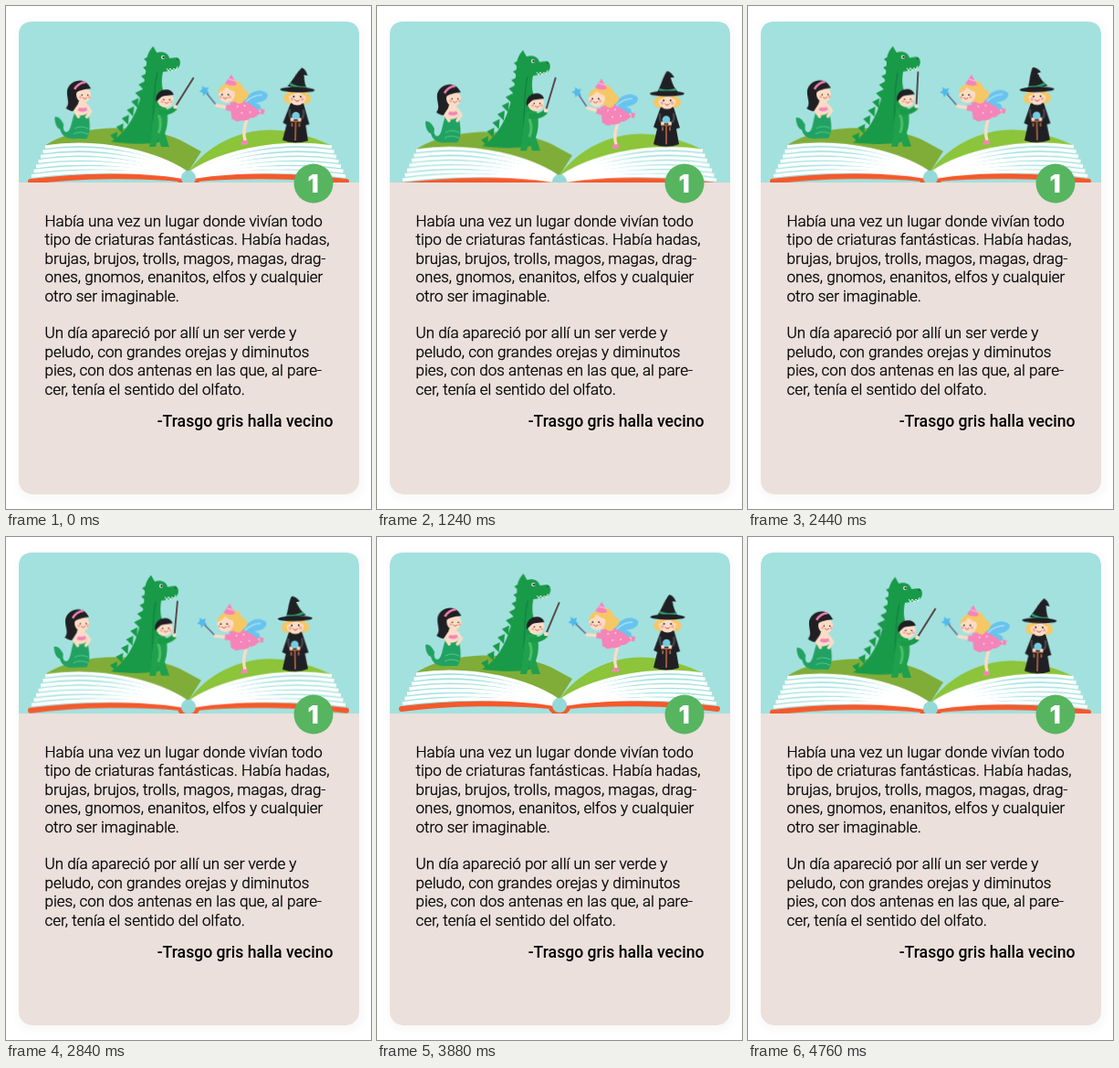
An HTML page for the animation above (4.8 s loop, 400 by 550 pixels).

```html
<!DOCTYPE html>
<html lang="es">
<head>
<meta charset="utf-8">
<title>Cuento</title>
<style>
html, body { margin: 0; width: 100%; height: 100%; overflow: hidden; background: #fff; }
svg { display: block; width: 400px; height: 550px; }
.story { font: 300 17px Roboto, sans-serif; fill: #000; stroke: #000; stroke-width: .35; }
.sign { font: 500 17.6px Roboto, sans-serif; fill: #000; }
.num { font: 900 27px Inter, sans-serif; fill: #fff; }
.skin { fill: #fcdcc4; }
.limb { fill: none; stroke: #fcdcc4; stroke-width: 3.4; stroke-linecap: round; }
.ink { fill: #202024; }
.smile { fill: none; stroke: #b4423c; stroke-width: 1; stroke-linecap: round; }
.cheek { fill: #f9a9a0; }
.pink { fill: #f584b9; }
.green { fill: #199a48; }
.gold { fill: #f6c765; }
</style>
</head>
<body>
<svg viewBox="0 0 400 550">
  <defs>
    <clipPath id="sky"><path d="M14 193V32Q14 17 30 17H371Q387 17 387 32V193Z"/></clipPath>
    <filter id="soft"><feGaussianBlur stdDeviation="4"/></filter>
    <g id="face">
      <circle class="ink" cx="-4" cy="-1" r="1"/><circle class="ink" cx="4" cy="-1" r="1"/>
      <circle class="cheek" cx="-6" cy="2" r="1.9"/><circle class="cheek" cx="6" cy="2" r="1.9"/>
      <path class="smile" d="M-2.5 3Q0 6 2.5 3"/>
    </g>
  </defs>

  <rect x="12" y="16" width="380" height="524" rx="16" fill="#000" opacity=".025" filter="url(#soft)"/>
  <rect x="14" y="17" width="373" height="517" rx="15" fill="#ebe0db"/>

  <g clip-path="url(#sky)">
    <path d="M14 17H387V193H14Z" fill="#a3e1de"/>
    <g id="book">
      <path d="M27 192C80 185 150 185 190 189C193 199 207 199 210 189C250 185 320 185 373 192" fill="none" stroke="#f4592c" stroke-width="6" stroke-linecap="round"/>
      <path d="M42 153C75 130 145 127 190 146L214 159L200 181C170 163 110 143 42 153Z" fill="#80ad38"/>
      <path d="M200 181C222 150 262 132 300 136C325 139 342 146 358 153C290 144 230 163 200 181Z" fill="#8cc43a"/>
      <g id="pages" fill="none" stroke="#fff" stroke-width="3.7"></g>
      <circle cx="200" cy="188" r="8" fill="#94d9d8"/>

      <g id="mermaid">
        <path d="M75 116C71 127 71 138 66 138C63 138 62 134 63 130C60 124 57 121 53 122C53 128 55 134 59 135C61 143 67 146 76 145H88C92 141 93 129 89 116Z" fill="#22a262"/>
        <path d="M75 134Q82 130 90 134M74 140Q81 136 90 140" fill="none" stroke="#52c98a" stroke-width="1"/>
        <path class="ink" d="M90 87C85 78 69 80 66 92C65 101 70 106 65 112C71 117 81 117 82 106Z"/>
        <path class="skin" d="M79 104H87L89 117Q82 122 75 118Z"/>
        <ellipse class="skin" cx="84" cy="97" rx="8" ry="8.5"/>
        <path class="ink" d="M74 96C74 83 87 81 92 90C84 91 79 92 74 96Z"/>
        <path d="M74 91Q78 84 86 83" fill="none" stroke="#f480b4" stroke-width="2.6"/>
        <use href="#face" transform="translate(85.5 98) scale(.8)"/>
        <path class="pink" d="M78 110Q83 113 88 110L88 114Q83 117 78 114Z"/>
        <path class="limb" d="M79 109L75 115L79 121M88 109L92 115L88 121" stroke-width="2.6"/>
      </g>

      <g id="dragon">
        <g id="spines" class="green"></g>
        <path class="green" d="M160 44L164 51C171 49 177 52 178 57L186 56C191 57 191 65 187 68C182 71 176 71 171 72C169 82 170 92 174 98V130L168 149C150 152 130 151 115 149C130 140 141 122 146 103C150 88 152 78 153 62C153 52 157 48 160 44Z"/>
        <path d="M165 73C160 92 163 112 159 146" fill="none" stroke="#108040" stroke-width="1.2"/>
        <path d="M175 68L177 71L179 68L181 71L183 68L185 70L187 66" fill="none" stroke="#fff" stroke-width=".9"/>
        <circle cx="171" cy="56" r="2" fill="#fff"/><circle class="ink" cx="171.500" cy="56" r="1.2"/>
        <circle class="ink" cx="187" cy="58" r=".7"/>
        <path d="M164 111H175C178 120 177 132 174 139L179 154H170L167 143L164 154H157C160 140 159 124 164 111Z" fill="#1fa04c"/>
        <path d="M167 119Q171 129 167 139" fill="none" stroke="#4dbd68" stroke-width="3"/>
        <circle class="skin" cx="174" cy="102" r="9"/>
        <path class="ink" d="M164 105C161 90 181 87 183 97C178 98 171 97 168 101Z"/>
        <use href="#face" transform="translate(175.500 103) scale(.8)"/>
        <path d="M185 110V73" id="wand" stroke="#594c4b" stroke-width="2" stroke-linecap="round"/>
        <path class="green" d="M167 113Q177 115 183 109L187 113Q179 121 167 119Z"/>
        <circle class="skin" cx="185" cy="110" r="2.300"/>
      </g>

      <g id="fairy">
        <path d="M259 106C264 94 278 88 286 96C287 102 280 105 272 106C280 107 281 113 275 114C268 114 262 111 259 106Z" fill="#68c4ee"/>
        <path d="M262 105Q270 97 280 97" fill="none" stroke="#a5ddf5" stroke-width="1.5"/>
        <path class="limb" d="M264 122C262 131 259 138 262 147M270 119L280 115"/>
        <path class="pink" d="M259 147H265V151L257 152ZM278 112L283 113L282 118L279 118Z"/>
        <path class="pink" d="M245 106L257 102C264 106 274 110 279 117C274 119 273 123 268 122C263 127 259 124 255 126C251 128 249 123 247 124Z"/>
        <path d="M252 110h2M260 109h2M257 117h2M266 116h2" stroke="#fff" stroke-width="1.500" opacity=".6"/>
        <circle class="gold" cx="248" cy="93" r="11.500"/><circle class="gold" cx="259" cy="97" r="6"/><circle class="gold" cx="255" cy="102" r="5"/>
        <circle class="skin" cx="241" cy="97" r="9"/>
        <path class="gold" d="M232 96C232 83 250 81 253 94C246 94 243 90 240 89C239 93 235 93 232 96Z"/>
        <use href="#face" transform="translate(239.500 98) scale(.85)"/>
        <path class="pink" d="M246 75L252 86Q246 89 239 85Z"/>
        <path d="M243 80L250 82" stroke="#f9b4d2" stroke-width="1.4"/>
        <g id="arm">
          <path d="M231 110L217 93" stroke="#666b91" stroke-width="1.5"/>
          <path class="limb" d="M247 112L230 109"/>
          <path class="pink" d="M252 109L241 108L240 114L250 116Z"/>
          <path id="star" fill="#54b9ea"/>
        </g>
      </g>

      <g id="witch">
        <path class="ink" d="M311 106H325L332 129L328 130L331 147Q317 152 303 147L307 130L303 128Z"/>
        <circle class="gold" cx="309" cy="101" r="6"/><circle class="gold" cx="327" cy="101" r="6"/>
        <circle class="skin" cx="318" cy="99" r="9.500"/>
        <path class="gold" d="M306 100C307 87 329 87 330 100C325 98 322 96 319 92C316 96 311 98 306 100Z"/>
        <use href="#face" transform="translate(318 100) scale(.95)"/>
        <path d="M310 113Q309 124 315 124M325 113Q327 124 320 124" fill="none" stroke="#44444a" stroke-width="2.400"/>
        <path d="M311 126H323M317 126V147M313 128V132M321 128V132" fill="none" stroke="#98593e" stroke-width="2"/>
        <circle class="skin" cx="313" cy="124" r="2"/><circle class="skin" cx="321" cy="124" r="2"/>
        <circle cx="317" cy="120" r="4.300" fill="#75cce1"/>
        <g id="hat">
          <path class="ink" d="M307 90C311 84 313 74 318 67C321 67 324 70 326 74L322 74C324 81 326 86 330 90Z"/>
          <path d="M309 87Q318 90 328 87" fill="none" stroke="#2fa06e" stroke-width="2.400"/>
        </g>
        <ellipse class="ink" cx="318" cy="91.500" rx="19" ry="3"/>
      </g>
    </g>
  </g>

  <circle cx="337" cy="194" r="21.500" fill="#57b560"/>
  <text class="num" x="336.500" y="203.500" text-anchor="middle">1</text>
  <g class="story" id="story"></g>
  <text class="sign" x="358.500" y="460" text-anchor="end">-Trasgo gris halla vecino</text>
</svg>
<script>
const $ = id => document.getElementById(id);
const add = (parent, name, attrs) => {
  const el = document.createElementNS('http://www.w3.org/2000/svg', name);
  for (const key in attrs) el.setAttribute(key, attrs[key]);
  return parent.appendChild(el);
};

const lines = [
  'Había una vez un lugar donde vivían todo',
  'tipo de criaturas fantásticas. Había hadas,',
  'brujas, brujos, trolls, magos, magas, drag-',
  'ones, gnomos, enanitos, elfos y cualquier',
  'otro ser imaginable.',
  '',
  'Un día apareció por allí un ser verde y',
  'peludo, con grandes orejas y diminutos',
  'pies, con dos antenas en las que, al pare-',
  'cer, tenía el sentido del olfato.'
];
lines.forEach((line, i) => {
  add($('story'), 'text', { x: 42.5, y: 241 + i * 20.4 }).textContent = line;
});

// Fanned page edges, mirrored about the spine
for (let k = 0; k < 7; k++) {
  const u = k / 6;
  const d = `M${43 - 15 * u} ${154 + 32 * u}C${110 - 30 * u} ${144 + 35 * u} ` +
    `${170 - 20 * u} ${164 + 16 * u} ${196 - 3 * u} ${181 + 6 * u}`;
  add($('pages'), 'path', { d });
  add($('pages'), 'path', { d, transform: 'matrix(-1 0 0 1 400 0)' });
}

// Spines down the back
for (let i = 0; i < 10; i++) {
  const u = i / 9;
  const x = 157 - 36 * u ** 1.7, y = 59 + 84 * u;
  add($('spines'), 'path', { d: `M${x + 1} ${y - 5}L${x - 7} ${y - 1}L${x} ${y + 6}Z` });
}

const points = Array.from({ length: 10 }, (_, i) => {
  const r = i % 2 ? 3 : 6, a = i * Math.PI / 5 - 2;
  return `${217 + r * Math.cos(a)} ${93 + r * Math.sin(a)}`;
});
$('star').setAttribute('d', `M${points.join('L')}Z`);

// id, pivot, transform function, one extreme, other extreme, phase in ms
const half = 2400;
const moves = [
  ['book', '0 0', 'translateY', '-4.3px', '4.3px', 1200],
  ['mermaid', '78px 144px', 'rotate', '1.2deg', '-1.2deg', 0],
  ['dragon', '165px 150px', 'rotate', '.7deg', '-.7deg', 0],
  ['wand', '185px 110px', 'rotate', '31.5deg', '3.5deg', 0],
  ['fairy', '262px 150px', 'rotate', '.8deg', '-.8deg', 0],
  ['arm', '248px 113px', 'rotate', '-7deg', '6deg', 1200],
  ['witch', '316px 148px', 'rotate', '1.4deg', '-1.4deg', 0],
  ['hat', '318px 89px', 'rotate', '11deg', '-11deg', 0]
];
for (const [id, pivot, fn, from, to, phase] of moves) {
  const el = $(id);
  el.style.transformOrigin = pivot;
  el.animate({ transform: [`${fn}(${from})`, `${fn}(${to})`] }, {
    duration: half, delay: -phase, iterations: Infinity,
    direction: 'alternate', easing: 'cubic-bezier(.37,0,.63,1)'
  });
}
</script>
</body>
</html>
```
